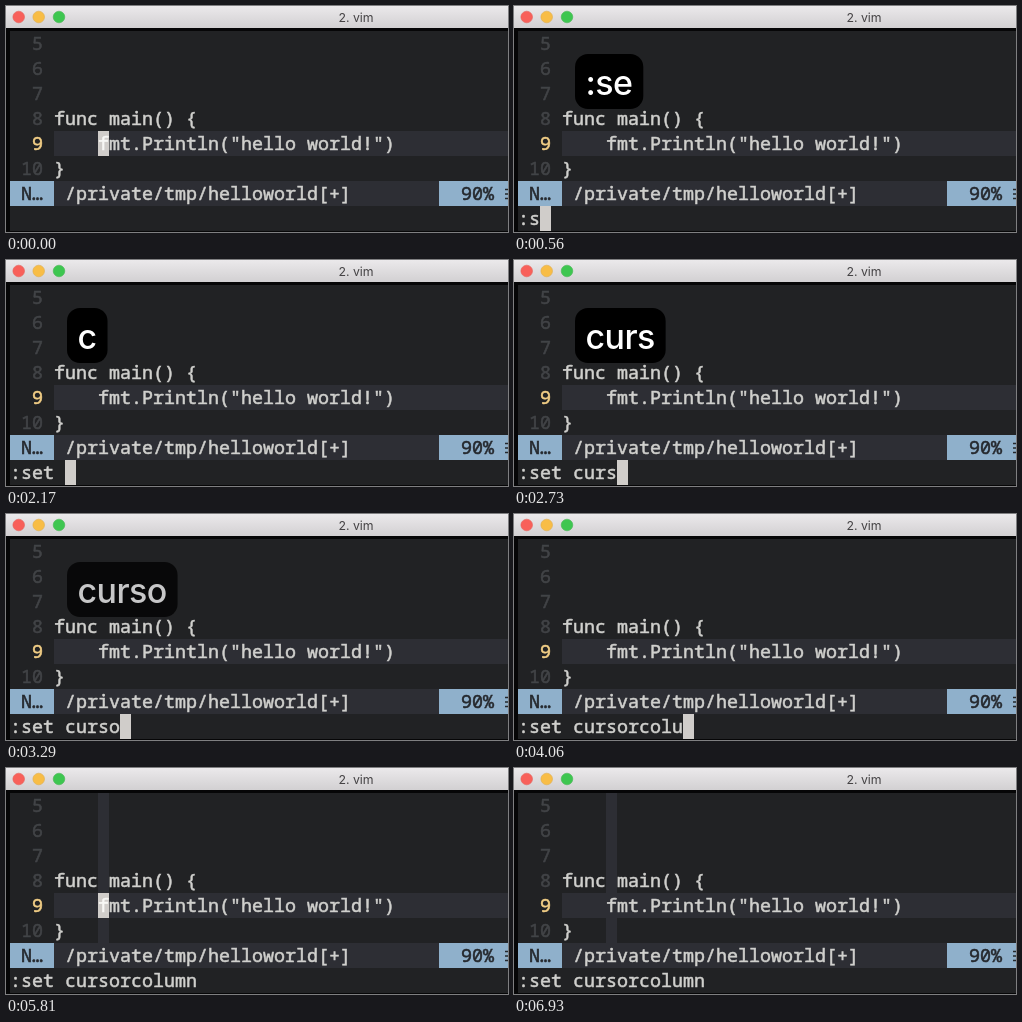
An HTML page for the animation above (7000 ms loop, 502 by 226 pixels).

```html
<!DOCTYPE html>
<html lang="en">
<head>
<meta charset="utf-8">
<title>vim</title>
<style>
html, body { margin: 0; width: 100%; height: 100%; overflow: hidden; background: #000; }
svg { display: block; }
text { white-space: pre; }
.mono { font: 500 18.333px "Noto Sans Mono", monospace; fill: #d0d0cd; stroke-width: .55px; font-variant-ligatures: none; }
.ui { font-family: Inter, sans-serif; }
#keys { font-size: 34px; font-weight: 500; letter-spacing: -.6px; fill: #fff; }
</style>
</head>
<body>
<svg id="stage" width="502" height="226" viewBox="0 0 502 226">
  <defs>
    <linearGradient id="bar" x2="0" y2="1">
      <stop stop-color="#ebe9eb"/>
      <stop offset="1" stop-color="#d2d0d2"/>
    </linearGradient>
  </defs>
  <rect width="502" height="226" fill="#060607"/>
  <rect width="502" height="22" fill="url(#bar)"/>
  <g stroke-width=".6">
    <circle cx="12.7" cy="11" r="5.8" fill="#f8605a" stroke="#e5605a"/>
    <circle cx="32.7" cy="11" r="5.8" fill="#f8bd46" stroke="#e0ae4c"/>
    <circle cx="53" cy="11" r="5.8" fill="#3ec650" stroke="#4bb556"/>
  </g>
  <text class="ui" x="350" y="15.5" font-size="12.3" text-anchor="middle" fill="#454345">2. vim</text>
  <rect x="4" y="25" width="498" height="200" fill="#212224"/>
  <rect x="48" y="125" width="454" height="25" fill="#2d2e34"/>
  <rect id="column" x="92" y="25" width="11" height="150" fill="#2d2e34"/>
  <rect x="4" y="175" width="498" height="25" fill="#2d2e34"/>
  <rect x="4" y="175" width="44" height="25" fill="#8fb0cb"/>
  <rect x="433" y="175" width="69" height="25" fill="#8fb0cb"/>
  <path d="M499 183.5h3m-3 4.5h3m-3 4.5h3" stroke="#25282d" stroke-width="1.6"/>
  <rect id="cursor" width="11" height="25" fill="#d0cdca"/>
  <g id="lines"></g>
  <g id="bezel">
    <rect id="box" x="61" y="48" height="55" rx="13" fill="#000"/>
    <text id="keys" class="ui" x="71.5" y="89"></text>
  </g>
</svg>
<script>
const LOOP = 7000, STEP = 70;
const COL = 11, ROW = 25, LEFT = 4;
const TEXT = "#d0d0cd", DIM = "#424447", DARK = "#25282d";
const ENTER = 5250, HIDE = 6650;
const FADE = 560;
const $ = id => document.getElementById(id);

function paint(el, color) {
  el.style.fill = el.style.stroke = color;
}

function write(col, row, str, color = TEXT) {
  const t = document.createElementNS("http://www.w3.org/2000/svg", "text");
  t.setAttribute("class", "mono");
  t.setAttribute("x", LEFT + col * COL);
  t.setAttribute("y", (row + 1) * ROW + 19);
  t.textContent = str;
  paint(t, color);
  $("lines").append(t);
  return t;
}

for (let n = 5; n <= 10; n++) {
  write(n < 10 ? 2 : 1, n - 5, n, n === 9 ? "#f3cf86" : DIM);
}
write(4, 3, "func main() {");
const first = write(8, 4, "f");
write(9, 4, "mt.Println(\"hello world!\")");
write(4, 5, "}");
write(1, 6, "N…", DARK);
write(5, 6, "/private/tmp/helloworld[+]");
write(41, 6, "90%", DARK);
const prompt = write(0, 7, "");

// Time at which each character of the command shows up
const command = ":set cursorcolumn";
const typed = [280, 420, 630, 700, 1750, 2240, 2380, 2520, 2730, 2870,
  3920, 3920, 3990, 4060, 4060, 4200, 4340];

// The key display runs one step ahead of the terminal
const groups = [
  { from: 0, to: 4, fade: 980 },
  { from: 5, to: 10, fade: 3150 }
];

const count = (t, from, to) => typed.slice(from, to).filter(at => at <= t).length;

function drawKeys(t) {
  const g = groups.find(g => t >= typed[g.from] - STEP && t < g.fade + FADE);
  $("bezel").style.display = g ? "" : "none";
  if (!g) return;
  const keys = $("keys");
  keys.textContent = command.slice(g.from, g.from + count(t + STEP, g.from, g.to));
  $("box").setAttribute("width", keys.getComputedTextLength() + 21.5);
  $("bezel").setAttribute("opacity", Math.min(1, 1 - (t - g.fade) / FADE));
}

function draw(time) {
  const t = Math.floor((time % LOOP) / STEP) * STEP;
  const n = count(t, 0, typed.length);
  const done = t >= ENTER;
  const typing = n > 0 && !done;
  prompt.textContent = command.slice(0, n);
  $("column").style.display = done ? "" : "none";

  const shown = t < HIDE;
  const cursor = $("cursor");
  cursor.style.display = shown ? "" : "none";
  cursor.setAttribute("x", LEFT + (typing ? n : 8) * COL);
  cursor.setAttribute("y", typing ? 200 : 125);
  paint(first, shown && !typing ? "#f7f7f5" : TEXT);
  drawKeys(t);
}

const start = performance.now();
function tick() {
  draw(performance.now() - start);
  requestAnimationFrame(tick);
}
tick();
</script>
</body>
</html>
```
